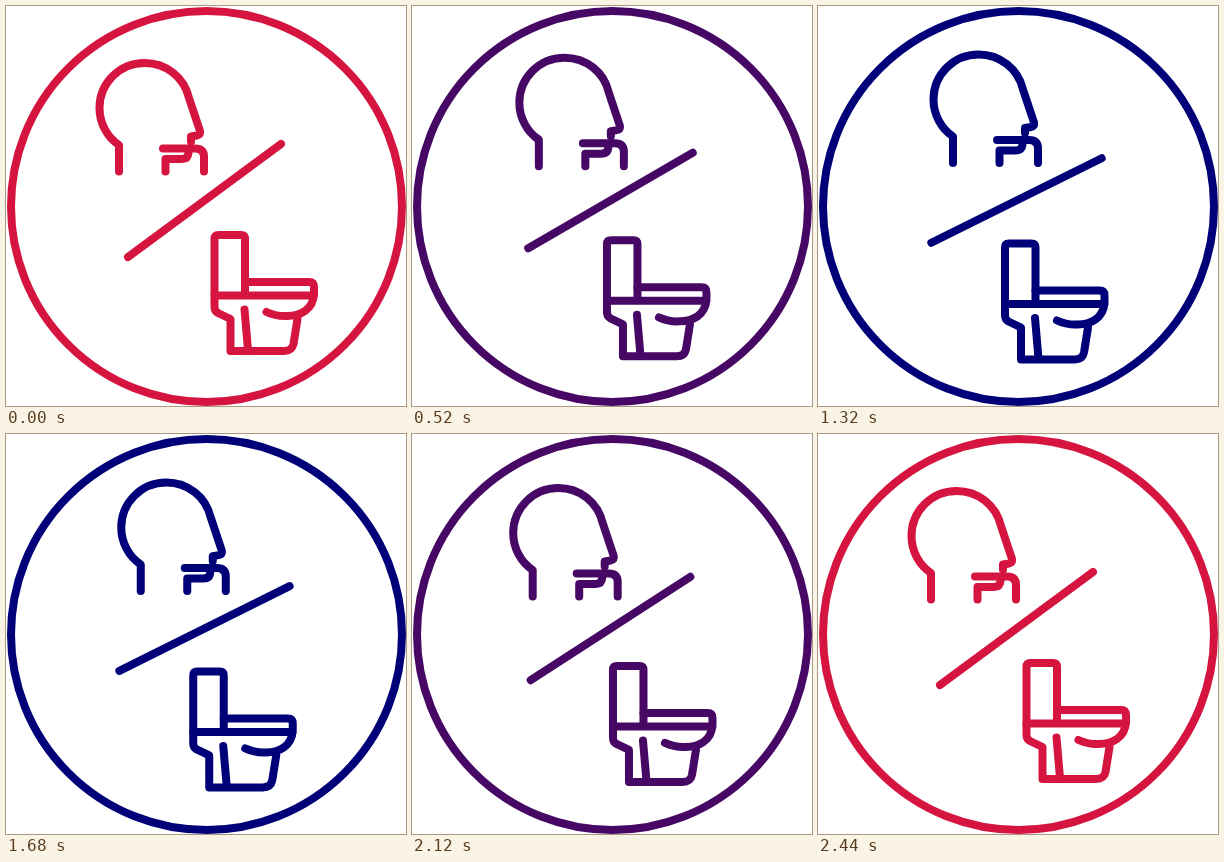
Animation, 400 px wide and 400 px high, one loop 2640 ms. Source, as an HTML page without scripts:

```html
<!DOCTYPE html>
<html lang="en">
<head>
<meta charset="utf-8">
<title>Swallow and flush icon</title>
<style>
  @property --p { syntax: "<number>"; inherits: true; initial-value: 0; }

  html, body { margin: 0; width: 100%; height: 100%; overflow: hidden; background: #fff; }

  svg {
    display: block;
    width: 100%;
    height: 100%;
    fill: none;
    stroke: currentColor;
    stroke-width: 8;
    stroke-linecap: round;
    stroke-linejoin: round;
    color: #d61440;
    animation: move 2640ms steps(2) -4ms infinite, tint 2640ms steps(12) -4ms infinite;
  }

  .head { transform: translate(calc(var(--p) * 22px), calc(var(--p) * -8.5px)); }
  .bar { transform-origin: 198.5px 194.5px; transform: rotate(calc(var(--p) * 10.05deg)); }
  .toilet { transform: translate(calc(var(--p) * -21.5px), calc(var(--p) * 8.5px)); }

  /* quick shift, slow drift, quick return; one step lasts 40 ms */
  @keyframes move {
    0% { --p: 0; }
    6.061% { --p: 0; animation-timing-function: steps(3); }
    10.606% { --p: .08; }
    13.636% { --p: .23; }
    16.667% { --p: .425; }
    19.697% { --p: .63; }
    22.727% { --p: .82; }
    25.758% { --p: .95; }
    28.788% { --p: .985; animation-timing-function: steps(14); }
    50% { --p: 1; animation-timing-function: steps(12); }
    68.182% { --p: .985; }
    71.212% { --p: .95; }
    74.242% { --p: .81; }
    77.273% { --p: .59; }
    80.303% { --p: .35; }
    83.333% { --p: .145; }
    86.364% { --p: .02; }
    89.394%, 100% { --p: 0; }
  }

  @keyframes tint {
    0%, 7.576% { color: #d61440; }
    25.758%, 74.242% { color: #000078; }
    92.424%, 100% { color: #d61440; }
  }
</style>
</head>
<body>
<svg viewBox="0 0 400 400">
  <circle cx="200.5" cy="200.5" r="195.5"/>
  <g class="head">
    <path d="M113 165.500V139C101 131 93.500 117 93.500 102A45 45 0 0 1 138.500 57C160 57 178 71 183 92L194 125Q195 129 191 129.500L185 130.500V135.500"/>
    <path d="M157 142.500H189Q198 142.500 198 151V165.500"/>
    <path d="M159.500 165.500V153H176Q182 153 182.500 147"/>
  </g>
  <path class="bar" d="M122 251L275 138"/>
  <g class="toilet">
    <path d="M239 289V233Q239 229 235 229H212.500Q208.500 229 208.500 233V301Q208.500 305 212 307L224.500 313V345H278Q286 345 287.500 338L291.500 313"/>
    <path d="M208.500 289.500H308M239 276H303Q308 276 308 281V288C307 304 294 310 281 310Q270 310.500 260.500 306"/>
    <path d="M238.500 303.500L242 344"/>
  </g>
</svg>
</body>
</html>
```
